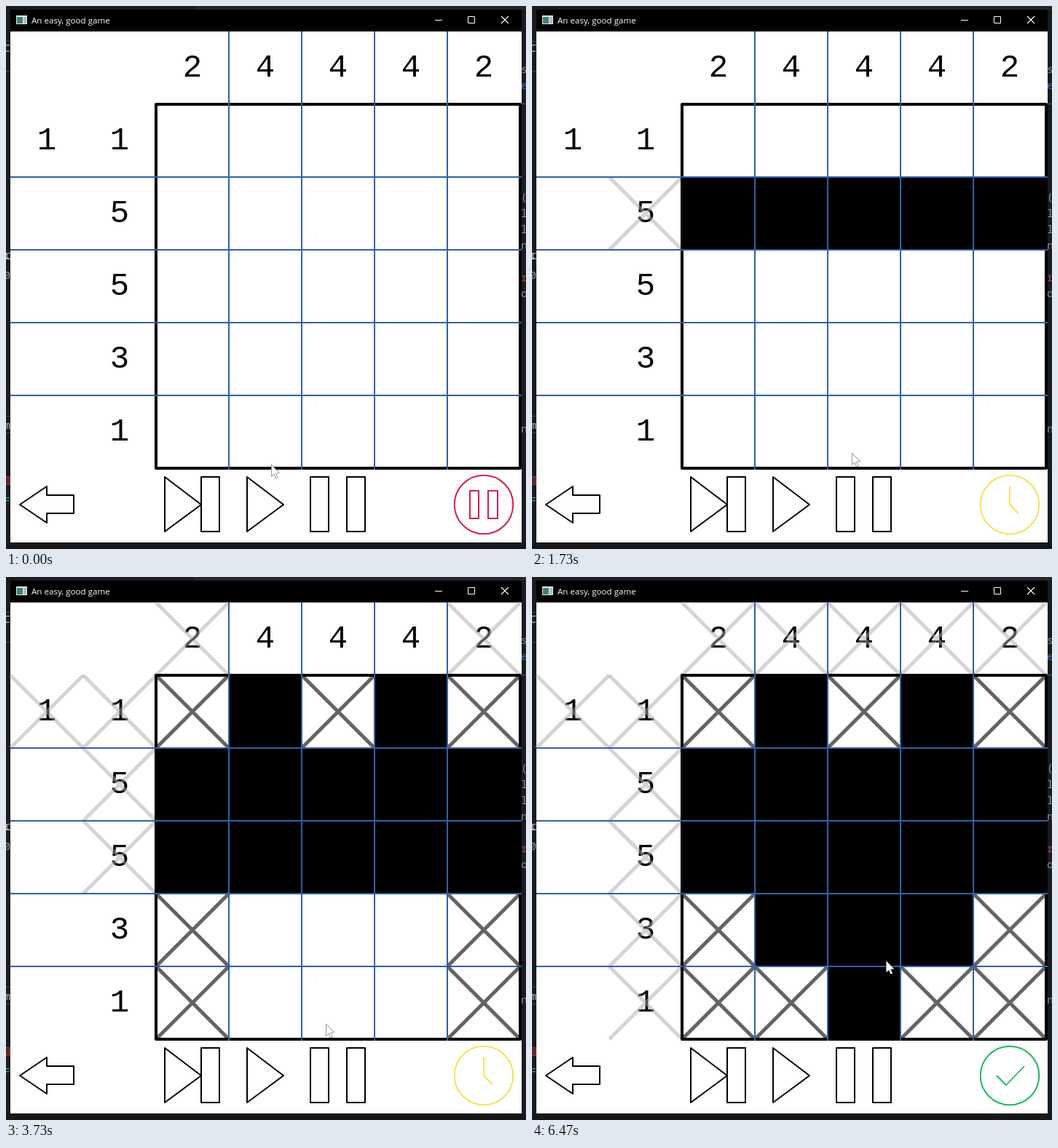
Write an HTML page with a canvas that moves like this. It is 714 by 746 pixels and loops after 6540 ms.

```html
<!DOCTYPE html>
<html lang="en">
<head>
<meta charset="utf-8">
<title>An easy, good game</title>
<style>
  html, body { margin: 0; width: 100%; height: 100%; overflow: hidden; background: #1b1c22; }
  canvas { display: block; }
</style>
</head>
<body>
<canvas id="stage" width="714" height="746"></canvas>
<script>
const ctx = document.getElementById('stage').getContext('2d');
const LOOP = 6540, FPS = 15, CELL = 100, LEFT = 206, TOP = 135;

// Tick at which each solving stage appears
const STAGE_TICKS = [26, 41, 56, 71, 86];
const CELLS = ['X#X#X', '#####', '#####', 'X###X', 'XX#XX'];
const CELL_STAGE = ['23332', '11111', '22222', '24442', '24542'];
// [column, row, digit, stage when crossed out]
const CLUES = [
  [0, -1, 2, 2], [1, -1, 4, 4], [2, -1, 4, 5], [3, -1, 4, 4], [4, -1, 2, 2],
  [-2, 0, 1, 3], [-1, 0, 1, 3], [-1, 1, 5, 1], [-1, 2, 5, 2], [-1, 3, 3, 4], [-1, 4, 1, 5]
];
// [first tick, last tick, x, y]
const MOVES = [[0, 10, 354, 683], [12, 17, 439, 614], [95, 97, 486, 527]];

function rect(x, y, w, h, color) {
  ctx.fillStyle = color;
  ctx.fillRect(x, y, w, h);
}

function line(points, color, width = 2, closed = false) {
  ctx.beginPath();
  for (let i = 0; i < points.length; i += 2) ctx.lineTo(points[i], points[i + 1]);
  if (closed) ctx.closePath();
  ctx.strokeStyle = color;
  ctx.lineWidth = width;
  ctx.stroke();
}

function box(x, y, w, h, color, width = 2) {
  ctx.strokeStyle = color;
  ctx.lineWidth = width;
  ctx.strokeRect(x, y, w, h);
}

function text(str, x, y, font, color, align = 'left') {
  ctx.font = font;
  ctx.fillStyle = color;
  ctx.textAlign = align;
  ctx.fillText(str, x, y);
}

function cross(x, y, color, width) {
  ctx.beginPath();
  ctx.moveTo(x, y);
  ctx.lineTo(x + CELL, y + CELL);
  ctx.moveTo(x + CELL, y);
  ctx.lineTo(x, y + CELL);
  ctx.strokeStyle = color;
  ctx.lineWidth = width;
  ctx.stroke();
}

function drawBackdrop() {
  const mono = '15px "Noto Sans Mono", monospace';
  rect(0, 0, 714, 746, '#1b1c22');
  rect(259, 0, 455, 5, '#25262d');
  rect(0, 737, 714, 9, '#16171b');
  for (const y of [48, 89, 563, 586]) rect(0, y, 6, 1, '#44464c');
  rect(708, 134, 6, 1, '#55575d');
  for (const [s, y, color] of [['C', 63, '#b8babd'], ['r', 347, '#b8babd'], ['0', 375, '#7d97a5'],
    ['m', 581, '#b8babd'], ['F', 685, '#35c94a']]) text(s, 6, y, mono, color, 'right');
  rect(0, 347, 6, 1, '#b8babd');
  rect(-1, 646, 6, 12, '#5a2328');
  box(-1, 646.5, 6, 11, '#a03a3a', 1);
  for (const [s, y, color] of [['s', 92, '#8d8f94'], ['e', 114, '#3f6fc0'], ['(', 267, '#8d8f94'],
    ['l', 290, '#8d8f94'], ['l', 312, '#8d8f94'], ['n', 334, '#8d8f94'], ['r', 378, '#a84450'],
    ['o', 400, '#8d8f94'], ['n', 586, '#8d8f94']]) text(s, 707, y, mono, color);
}

function drawWindow() {
  rect(6, 5, 702, 30, '#000');
  rect(6, 35, 702, 702, '#fff');
  rect(14, 13, 15, 12, '#e4e8e8');
  rect(15, 15, 8, 9, '#3f8078');
  rect(24, 15, 4, 9, '#aebcbc');
  text('An easy, good game', 35, 24, '11.6px "Open Sans", sans-serif', '#fff');
  line([589, 19.5, 599, 19.5], '#fff', 1);
  box(634.5, 14.5, 9, 9, '#fff', 1);
  line([680, 14, 690, 24], '#fff', 1.1);
  line([690, 14, 680, 24], '#fff', 1.1);
}

function drawBoard(stage) {
  for (const [col, row, digit, done] of CLUES) {
    const x = LEFT + col * CELL, y = TOP + row * CELL;
    text(digit, x + 50, y + 62, '44px "Liberation Mono", monospace', '#000', 'center');
    if (stage >= done) cross(x, y, 'rgba(169,169,169,.5)', 5);
  }
  CELLS.forEach((cells, row) => [...cells].forEach((cell, col) => {
    if (stage < CELL_STAGE[row][col]) return;
    const x = LEFT + col * CELL, y = TOP + row * CELL;
    if (cell === '#') rect(x, y, CELL, CELL, '#000');
    else cross(x, y, '#646464', 5);
  }));
  box(LEFT, TOP, 500, 500, '#000', 4);
  for (let i = 1; i < 5; i++) {
    const x = LEFT + i * CELL, y = TOP + i * CELL;
    line([x, 35, x, 637], '#3161a4');
    line([6, y, 708, y], '#3161a4');
  }
}

function drawButtons() {
  line([19, 685, 56, 660, 56, 672, 93, 672, 93, 697, 56, 697, 56, 710], '#000', 2, true);
  for (const x of [218, 331]) line([x, 647, x + 50, 685, x, 722], '#000', 2, true);
  for (const x of [268, 418, 468]) box(x, 647, 25, 75, '#000');
}

function drawStatus(state) {
  const color = { paused: '#d91e4b', waiting: '#fbdf5b', solved: '#18bd5b' }[state];
  ctx.beginPath();
  ctx.arc(656, 685, 40.3, 0, 2 * Math.PI);
  ctx.strokeStyle = color;
  ctx.lineWidth = 2;
  ctx.stroke();
  if (state === 'paused') {
    box(637, 666, 12, 38, color);
    box(662, 666, 13, 38, color);
  } else if (state === 'waiting') {
    line([656, 660, 656, 685, 668, 697], color);
  } else {
    line([638, 685, 651, 698, 676, 672], color, 1.8);
  }
}

function drawCursor(tick) {
  let x = 364, y = 630;
  for (const [from, to, nextX, nextY] of MOVES) {
    const p = Math.min(1, Math.max(0, (tick - from) / (to - from)));
    const eased = p * p * (3 - 2 * p);
    x += (nextX - x) * eased;
    y += (nextY - y) * eased;
  }
  ctx.save();
  ctx.translate(x, y);
  ctx.fillStyle = '#fff';
  line([0.5, 0.5, 0.5, 16, 4, 12.8, 6.6, 18.6, 8.8, 17.6, 6.3, 12, 11, 11.5], '#333', 1, true);
  ctx.fill();
  ctx.restore();
}

function frame() {
  const tick = Math.floor((performance.now() % LOOP + 5) * FPS / 1000);
  const stage = STAGE_TICKS.filter(start => tick >= start).length;
  ctx.lineJoin = 'round';
  drawBackdrop();
  drawWindow();
  drawBoard(stage);
  drawButtons();
  drawStatus(stage === 5 ? 'solved' : tick >= 10 ? 'waiting' : 'paused');
  drawCursor(tick);
  requestAnimationFrame(frame);
}
frame();
</script>
</body>
</html>
```
